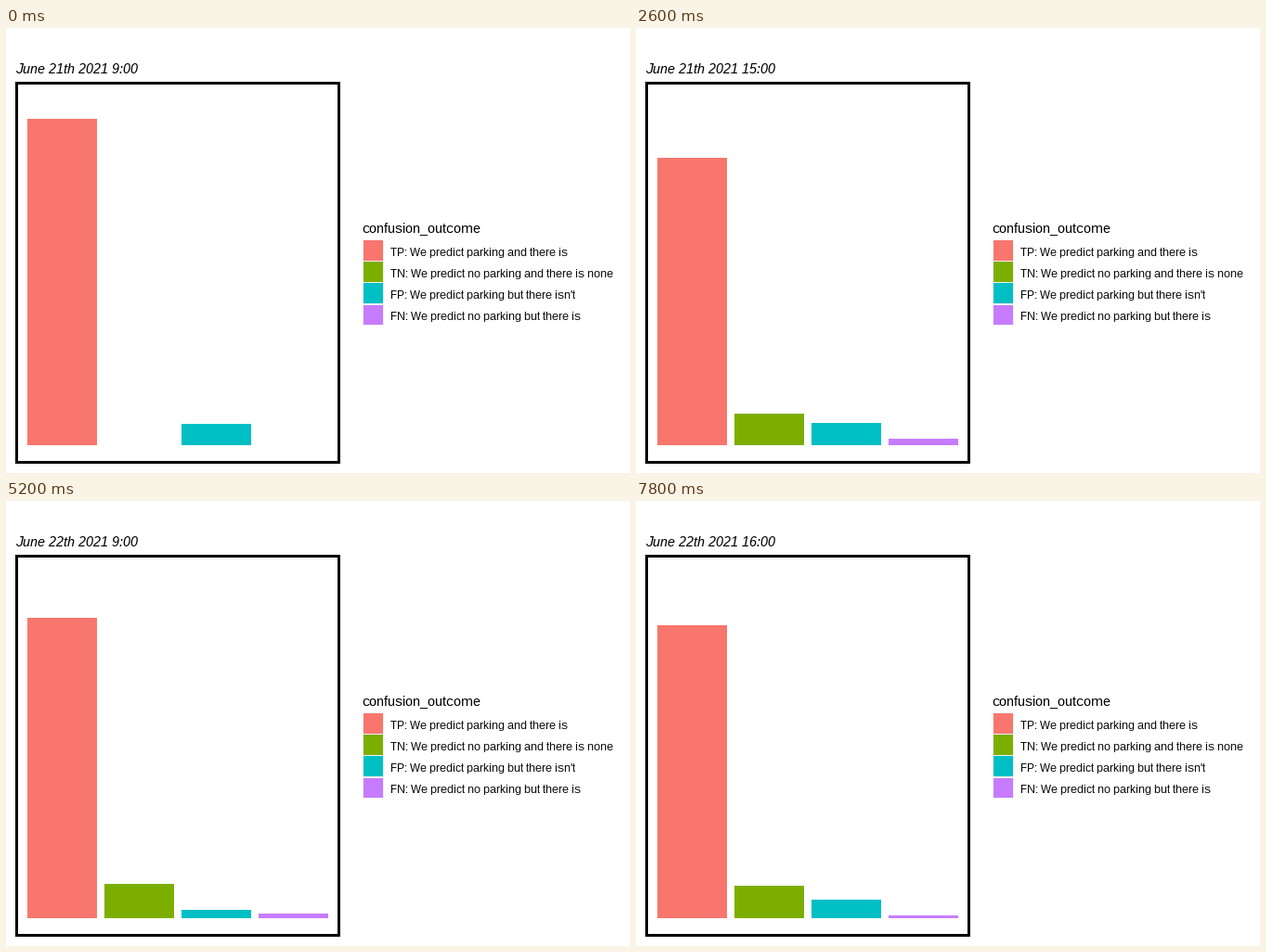
Animation, 672 px wide and 480 px high, one loop 8000 ms. Source, as a matplotlib script:

```python
import matplotlib.pyplot as plt
import numpy as np
from matplotlib.animation import FuncAnimation
from matplotlib.patches import Rectangle

W, H, DPI = 672, 480, 96
FRAMES, STEP_MS = 40, 200
HOURS_PER_FRAME = 0.52
OPEN_HOUR, HOURS_PER_DAY, FIRST_DAY = 9, 13, 21
BASE, BAR_W, BAR_GAP = 450, 75, 8
TOTAL = 375  # summed height of the four bars

COLORS = ["#F8766D", "#7CAE00", "#00BFC4", "#C77CFF"]
LABELS = [
    "TP: We predict parking and there is",
    "TN: We predict no parking and there is none",
    "FP: We predict parking but there isn't",
    "FN: We predict no parking but there is",
]

# heights of the TN, FP and FN bars at a few moments; TP takes the rest
KEY_TIMES = [0, 7, 13, 18, 26, 32, 39]
TRACKS = [
    [0, 59, 34, 11.4, 37, 73.3, 35.3],
    [23, 19, 24, 5.2, 9, 20.1, 20.1],
    [0, 14, 7, 0, 5, 12.2, 3.2],
]

# crisp, whole-pixel glyph shapes and spacing
plt.rcParams.update({
    "font.family": "Liberation Sans",
    "text.hinting": "native",
    "text.hinting_factor": 1,
    "text.kerning_factor": 6,
})
fig = plt.figure(figsize=(W / DPI, H / DPI), dpi=DPI, facecolor="white")
ax = fig.add_axes([0, 0, 1, 1])
ax.set_xlim(0, W)
ax.set_ylim(H, 0)
ax.axis("off")


def box(x, y, w, h, color):
    return ax.add_patch(Rectangle((x, y), w, h, facecolor=color,
                                  linewidth=0, antialiased=False))


def label(x, y, text, px, **kw):
    return ax.text(x, y, text, fontsize=px * 72 / DPI, color="black",
                   va="baseline", ha="left", **kw)


def heights(n):
    rest = [np.interp(n, KEY_TIMES, track) for track in TRACKS]
    return [round(float(h)) for h in (TOTAL - sum(rest), *rest)]


# panel border
box(10, 58, 350, 412, "black")
box(13, 61, 344, 406, "white")

# legend
label(383, 220, "confusion_outcome", 15)
box(384, 228, 23, 93, "#F2F2F2")
for i, (color, text) in enumerate(zip(COLORS, LABELS)):
    y = 229.4 + 23.04 * i
    top, bottom = round(y), round(y + 21.6)
    box(385, top, 21, bottom - top, color)
    label(414, 246 + 23 * i, text, 12)

title = label(10, 49, "", 15, style="italic")
bars = [box(23 + i * (BAR_W + BAR_GAP), BASE, BAR_W, 0, c)
        for i, c in enumerate(COLORS)]


def update(n):
    day, hour = divmod(int(n * HOURS_PER_FRAME), HOURS_PER_DAY)
    title.set_text(f"June {FIRST_DAY + day}th 2021 {OPEN_HOUR + hour}:00")
    for bar, h in zip(bars, heights(n)):
        bar.set_y(BASE - h)
        bar.set_height(h)
        bar.set_visible(h > 0)
    return [title, *bars]


anim = FuncAnimation(fig, update, frames=FRAMES, interval=STEP_MS,
                     init_func=lambda: update(0), repeat=True, repeat_delay=0)
plt.show()
```
